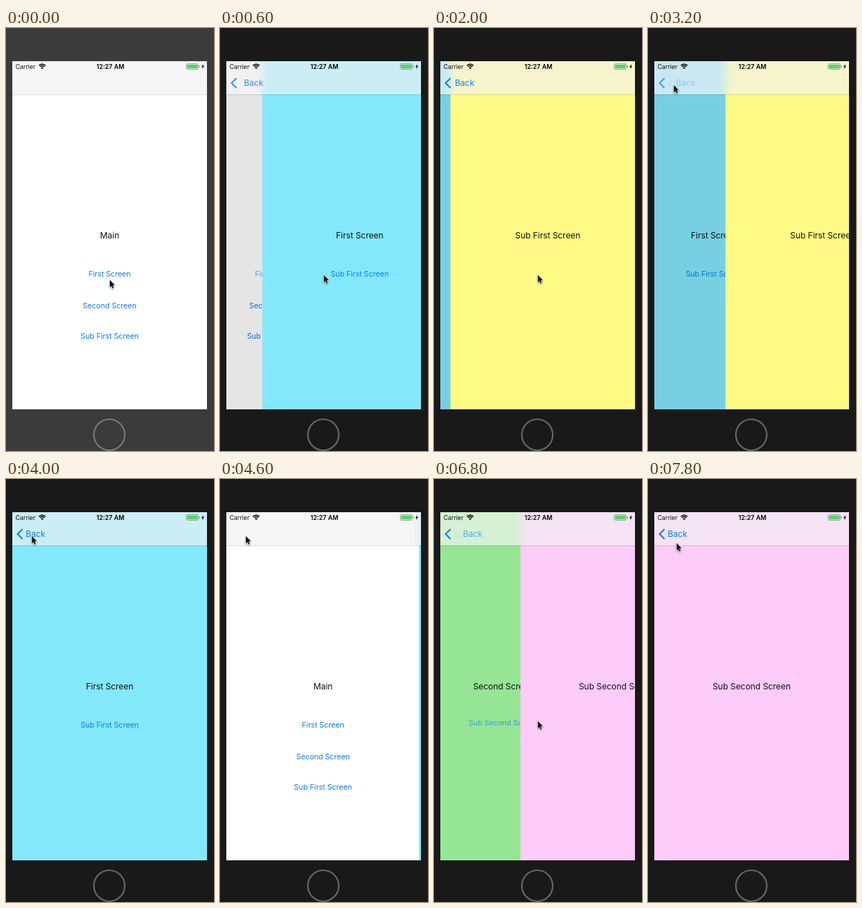
An HTML page with a canvas that plays this animation: 296 by 599 pixels, repeating every 8000 ms.

```html
<!DOCTYPE html>
<html lang="en">
<head>
<meta charset="utf-8">
<title>Stack navigation</title>
<style>
  html, body { margin: 0; width: 100%; height: 100%; overflow: hidden; background: #191919; }
  canvas { display: block; }
</style>
</head>
<body>
<canvas id="stage" width="296" height="599"></canvas>
<script>
const ctx = document.getElementById('stage').getContext('2d');
const LOOP = 8000, STEP = 200;
const LEFT = 9, TOP = 47, WIDTH = 277, HEIGHT = 493, BAR = 47, MID = 147.5;
const BLUE = '#0a7cf8', FONT = 'Inter, Roboto, sans-serif';

const screens = {
  main: { title: 'Main', color: [255, 255, 255],
    links: [['First Screen', 348.5], ['Second Screen', 393.5], ['Sub First Screen', 436]] },
  first: { title: 'First Screen', color: [132, 232, 251], links: [['Sub First Screen', 348]] },
  second: { title: 'Second Screen', color: [166, 253, 164], links: [['Sub Second Screen', 345.5]] },
  subFirst: { title: 'Sub First Screen', color: [253, 251, 132], links: [] },
  subSecond: { title: 'Sub Second Screen', color: [253, 204, 248], links: [] }
};

const moves = [
  { at: -1000, under: 'main', top: 'first', push: false },
  { at: 428, under: 'main', top: 'first', push: true },
  { at: 1739, under: 'first', top: 'subFirst', push: true },
  { at: 3129, under: 'first', top: 'subFirst', push: false },
  { at: 4233, under: 'main', top: 'first', push: false },
  { at: 5506, under: 'main', top: 'second', push: true },
  { at: 6690, under: 'second', top: 'subSecond', push: true }
];

// Cursor tip: time, x, y
const pointer = [
  [0, 147, 356], [200, 147, 356], [400, 147, 349], [2100, 147, 349], [2850, 36, 80],
  [4600, 36, 80], [5400, 142, 390], [5900, 142, 390], [6600, 147, 342],
  [7000, 147, 342], [7800, 40, 90], [LOOP, 40, 90]
];

const rgb = (color, dim = 0) => `rgb(${color.map(c => Math.round(c * (1 - dim)))})`;

// Critically damped spring: the share of the way still to go
function remaining(ms) {
  const k = 0.018 * ms, rest = (1 + k) * Math.exp(-k);
  return rest < 0.002 ? 0 : rest;
}

function text(str, x, y, size, color, align = 'center', weight = 400) {
  ctx.font = `${weight} ${size}px ${FONT}`;
  ctx.fillStyle = color;
  ctx.textAlign = align;
  ctx.textBaseline = 'alphabetic';
  ctx.fillText(str, x, y + size * 0.36);
}

function shape(points, fill, stroke, line = 1) {
  ctx.beginPath();
  points.forEach(([x, y]) => ctx.lineTo(x, y));
  ctx.closePath();
  if (stroke) {
    ctx.strokeStyle = stroke;
    ctx.lineWidth = line;
    ctx.stroke();
  }
  ctx.fillStyle = fill;
  ctx.fill();
}

function drawScreen(screen, dx, dim, pressed) {
  ctx.save();
  ctx.translate(dx, 0);
  ctx.fillStyle = rgb(screen.color);
  ctx.fillRect(LEFT, TOP, WIDTH, HEIGHT);
  text(screen.title, MID, 293.5, 11.9, '#111');
  for (const [label, y] of screen.links) {
    ctx.globalAlpha = label === pressed ? 0.6 : 1;
    text(label, MID, y, 10.6, BLUE);
  }
  ctx.globalAlpha = 1;
  ctx.fillStyle = `rgba(0,0,0,${dim})`;
  ctx.fillRect(LEFT, TOP, WIDTH, HEIGHT);
  ctx.restore();
}

function drawBar(under, top, offset, dim, edge) {
  const blend = ctx.createLinearGradient(edge - 8, 0, edge + 8, 0);
  blend.addColorStop(0, rgb(under.color, offset < 1 ? dim * 0.5 : 0));
  blend.addColorStop(1, rgb(top.color));
  ctx.fillStyle = offset <= 0 ? rgb(top.color) : offset >= 1 ? rgb(under.color) : blend;
  ctx.fillRect(LEFT, TOP, WIDTH, BAR);
  ctx.fillStyle = 'rgba(242,242,243,0.65)';
  ctx.fillRect(LEFT, TOP, WIDTH, BAR);
  ctx.fillStyle = 'rgba(0,0,0,0.2)';
  ctx.fillRect(LEFT, TOP + BAR, WIDTH, 0.7);
}

function drawBack(isRoot, offset, pressed) {
  ctx.globalAlpha = (isRoot ? 1 - offset : 1) * (pressed ? 0.7 : 1);
  ctx.strokeStyle = BLUE;
  ctx.lineWidth = 2;
  ctx.beginPath();
  ctx.moveTo(23.5, 71);
  ctx.lineTo(16.5, 78);
  ctx.lineTo(23.5, 85);
  ctx.stroke();
  ctx.globalAlpha = (1 - offset) * (pressed ? 0.45 : 1);
  text('Back', 28 + 32 * offset, 78, 11.9, BLUE, 'left');
  if (!isRoot) {
    ctx.globalAlpha = offset ** 3;
    text('Back', 28, 78, 11.9, BLUE, 'left');
  }
  ctx.globalAlpha = 1;
}

function drawStatus() {
  text('Carrier', 13.5, 54.5, 8.7, '#111', 'left');
  text('12:27 AM', 148.5, 54.5, 8.9, '#000', 'center', 600);

  ctx.strokeStyle = '#000';
  ctx.lineWidth = 1.5;
  for (const r of [6.3, 3.9]) {
    ctx.beginPath();
    ctx.arc(51.5, 57.5, r, -Math.PI * 0.77, -Math.PI * 0.23);
    ctx.stroke();
  }
  ctx.beginPath();
  ctx.moveTo(51.5, 58);
  ctx.arc(51.5, 58, 2.4, -Math.PI * 0.77, -Math.PI * 0.23);
  ctx.fillStyle = '#000';
  ctx.fill();

  ctx.strokeStyle = '#888';
  ctx.lineWidth = 0.8;
  ctx.beginPath();
  ctx.roundRect(256.5, 50.6, 17.4, 7.8, 2);
  ctx.stroke();
  ctx.fillStyle = '#4cd964';
  ctx.fillRect(257.7, 51.8, 15, 5.4);
  ctx.fillStyle = '#888';
  ctx.fillRect(274.8, 53.2, 1, 2.6);
  shape([[281, 51], [278, 55.2], [279.8, 55.2], [279.2, 58.2], [282.2, 53.8], [280.4, 53.8]], '#111');
}

function drawPointer(t) {
  const next = Math.max(1, pointer.findIndex(p => p[0] > t));
  const [t0, x0, y0] = pointer[next - 1], [t1, x1, y1] = pointer[next];
  const u = (t - t0) / (t1 - t0), ease = u * u * (3 - 2 * u);
  ctx.save();
  ctx.translate(x0 + (x1 - x0) * ease, y0 + (y1 - y0) * ease);
  ctx.shadowColor = 'rgba(0,0,0,0.35)';
  ctx.shadowBlur = 2;
  ctx.shadowOffsetY = 1;
  shape([[0.8, 0.8], [0.8, 11], [3.1, 8.9], [4.7, 12.6], [6.3, 11.9], [4.7, 8.3], [7.8, 8.1]],
    '#111', '#fff', 1.4);
  ctx.restore();
}

function draw(t) {
  const move = moves.filter(m => m.at <= t).pop();
  const rest = remaining(t - move.at);
  const offset = move.push ? rest : 1 - rest;
  const under = screens[move.under], top = screens[move.top];
  const dim = Math.min(0.1, 0.16 * (1 - offset));
  const edge = LEFT + WIDTH * offset;
  const upcoming = moves.find(m => m.at > t && m.at - t < 130);
  const pressing = upcoming || (rest > 0 ? move : null);
  const pressedLink = pressing && pressing.push ? screens[pressing.top].title : '';
  const pressedBack = !!pressing && !pressing.push && (!!upcoming || t - move.at < 150);

  ctx.fillStyle = t < STEP ? '#3b3b3b' : '#191919';
  ctx.fillRect(0, 0, 296, 599);
  ctx.strokeStyle = t < STEP ? '#777' : '#666';
  ctx.lineWidth = 2.2;
  ctx.beginPath();
  ctx.arc(147, 576, 22, 0, Math.PI * 2);
  ctx.stroke();

  ctx.save();
  ctx.beginPath();
  ctx.rect(LEFT, TOP, WIDTH, HEIGHT);
  ctx.clip();
  drawScreen(under, -0.3 * WIDTH * (1 - offset), dim, pressedLink);
  if (offset < 1) drawScreen(top, WIDTH * offset, 0, pressedLink);
  drawBar(under, top, offset, dim, edge);
  drawBack(move.under === 'main', offset, pressedBack);
  drawStatus();
  ctx.restore();
  drawPointer(t);
}

function tick() {
  draw(Math.floor((performance.now() % LOOP) / STEP) * STEP);
  requestAnimationFrame(tick);
}
tick();
</script>
</body>
</html>
```
